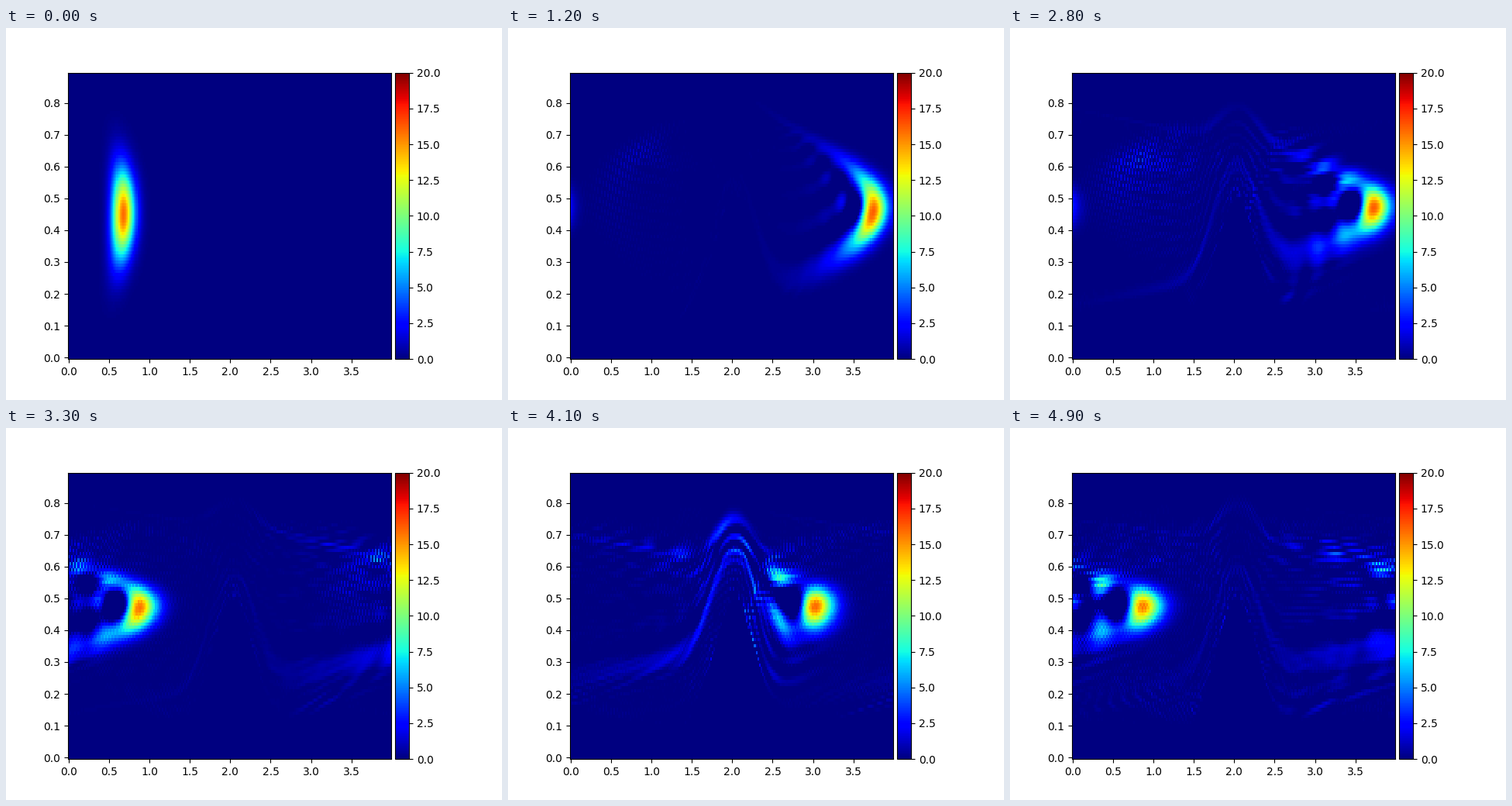
Recreate the animation shown at these times as a matplotlib script. Size 640 px wide and 480 px high, loop 5000 ms.

```python
import numpy as np
import matplotlib.pyplot as plt
from matplotlib.animation import FuncAnimation

# Tracer carried by channel flow over a bump, periodic in x.
FRAMES, INTERVAL, SUBSTEPS = 50, 100, 32
NX, NY, DX, DY = 200, 90, 0.02, 0.01
SPEED = 0.231                      # centre-line speed per frame
FLOOR, CEILING = 0.05, 0.895
BUMP_X, BUMP_HEIGHT, BUMP_SPREAD = 2.03, 0.45, 0.14
START, SIGMA = (0.45, 0.45), 0.1

x = np.arange(NX) * DX
y = np.arange(NY) * DY


def face_velocities():
    """Divergence-free velocities on cell faces from a stream function."""
    xc = x - DX / 2
    yc = (np.arange(NY + 1) - 0.5) * DY
    floor = FLOOR + BUMP_HEIGHT * np.exp(-(xc - BUMP_X) ** 2 / BUMP_SPREAD)
    eta = np.clip((yc[:, None] - floor) / (CEILING - floor), 0, 1)
    psi = 4 * SPEED * (CEILING - FLOOR) * (eta ** 2 / 2 - eta ** 3 / 3)
    u = np.diff(psi, axis=0) / DY
    w = (psi - np.roll(psi, -1, axis=1)) / DX
    return u, w[1:-1]


u, w = face_velocities()


def rate(c):
    flux_x = u * (c + np.roll(c, 1, axis=1)) / 2
    flux_y = np.zeros((NY + 1, NX))
    flux_y[1:-1] = w * (c[1:] + c[:-1]) / 2
    return (flux_x - np.roll(flux_x, -1, axis=1)) / DX - np.diff(flux_y, axis=0) / DY


def step(c, dt):
    k1 = rate(c)
    k2 = rate(c + dt / 2 * k1)
    k3 = rate(c + dt / 2 * k2)
    k4 = rate(c + dt * k3)
    return c + dt / 6 * (k1 + 2 * k2 + 2 * k3 + k4)


def simulate():
    r2 = (x - START[0]) ** 2 + (y[:, None] - START[1]) ** 2
    c = np.exp(-r2 / (2 * SIGMA ** 2)) / (2 * np.pi * SIGMA ** 2)
    states = []
    for _ in range(FRAMES):
        for _ in range(SUBSTEPS):
            c = step(c, 1 / SUBSTEPS)
        states.append(c)
    return states


states = simulate()

fig, ax = plt.subplots(figsize=(6.4, 4.8), dpi=100)
mesh = ax.pcolormesh(x, y, states[0], cmap="jet", vmin=0, vmax=20, shading="nearest")
fig.colorbar(mesh, ax=ax, pad=0.01)


def update(i):
    mesh.set_array(states[i])
    return (mesh,)


anim = FuncAnimation(fig, update, frames=FRAMES, interval=INTERVAL,
                     repeat=True, repeat_delay=0, blit=False)
plt.show()
```
